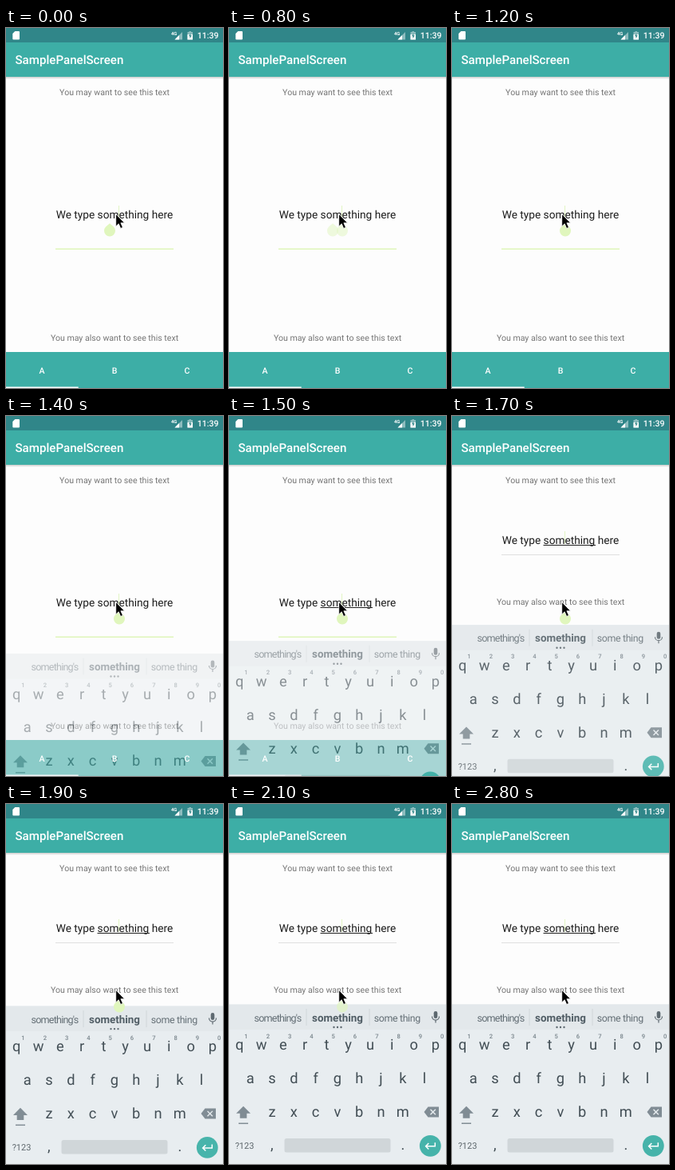
An HTML page that plays this animation: 272x450 px, repeating every 3000 ms.

```html
<!DOCTYPE html>
<html lang="en">
<head>
<meta charset="utf-8">
<style>
  html, body { margin: 0; width: 100%; height: 100%; overflow: hidden; background: #fdfdfd; }
  svg { display: block; width: 272px; height: 450px; font-family: Roboto, sans-serif; text-rendering: geometricPrecision; }
  .mid { text-anchor: middle; }
  .note { font-size: 10.58px; fill: #757575; }
  .medium { font-weight: 500; }
  .key { font-size: 18.3px; fill: #414d54; }
  .hint { font-size: 7.6px; font-weight: 500; fill: #78848b; }
</style>
</head>
<body>
<svg viewBox="0 0 272 450">
  <defs>
    <linearGradient id="shade" x2="0" y2="1">
      <stop stop-opacity=".2"/><stop offset="1" stop-opacity="0"/>
    </linearGradient>
    <path id="drop" d="M0-8.8 L5-4.4 A7 7 0 1 1-5-4.4Z" fill="#e0f6bd"/>
  </defs>

  <rect width="272" height="450" fill="#fdfdfd"/>
  <rect y="61" width="272" height="3" fill="url(#shade)"/>
  <rect y="18" width="272" height="43" fill="#3daea6"/>
  <rect width="272" height="18" fill="#308689"/>
  <text x="11.5" y="45.2" font-size="15.1" class="medium" fill="#fff">SamplePanelScreen</text>

  <g fill="#fff">
    <path d="M11.3 4H16q1 0 1 1v8.500q0 1-1 1H9.300q-1 0-1-1V7Z"/>
    <text x="207" y="8.500" font-size="5.800" font-weight="700">4G</text>
    <path d="M221 5V14.500H211.500Z" opacity=".45"/>
    <path d="M217 9V14.500H211.500Z"/>
    <path d="M227.500 5h2V4h2.500v1h2v9.500h-6.500Z" opacity=".45"/>
    <path d="M227.500 8h6.500v6.500h-6.500Z"/>
    <path d="M231.300 6.500l-2.300 3.800h1.500v3l2.300-4h-1.500Z" fill="#308689"/>
    <text x="239.700" y="12.900" font-size="10.600" class="medium">11:39</text>
  </g>

  <text x="136" y="84" class="mid note">You may want to see this text</text>
  <text id="lower" x="136" class="mid note">You may also want to see this text</text>
  <g id="field">
    <text x="136" y="237.900" font-size="13.7" class="mid" fill="#1c1c1c">We type something here</text>
    <path id="underline" d="M114.500 239.500H180" stroke="#222"/>
    <path d="M141.500 222v16" stroke="#d9f2b0" stroke-opacity=".75"/>
  </g>
  <path id="rule"/>

  <g id="tabs">
    <rect y="405" width="272" height="45" fill="#3daea6"/>
    <rect y="448.500" width="90.700" height="1.500" fill="#fff"/>
  </g>

  <g id="keyboard">
    <rect y="250.500" width="272" height="199.500" fill="#e8edf0"/>
    <rect y="250.500" width="272" height="31.500" fill="#e3e8eb"/>
    <path d="M97 256v21M176 256v21" stroke="#d0d6d9"/>
    <g class="mid" fill="#636e75">
      <text x="61" y="271.700" font-size="12.6" letter-spacing="-.8">something's</text>
      <text x="136" y="271.700" font-size="13.4" font-weight="700" fill="#4f5c64">something</text>
      <text x="210.800" y="271.700" font-size="12.4" letter-spacing="-.35">some thing</text>
    </g>
    <g fill="#5d686f">
      <circle cx="131.500" cy="279" r="1.200"/><circle cx="136" cy="279" r="1.200"/><circle cx="140.500" cy="279" r="1.200"/>
      <rect x="256.700" y="259" width="4.600" height="9" rx="2.300"/>
      <path d="M254.500 265.500a4.500 4.500 0 0 0 9 0M259 270v3.500" fill="none" stroke="#5d686f" stroke-width="1.200"/>
    </g>
    <g id="keys" class="mid"></g>
    <g fill="#808c94">
      <path d="M18 377.700L27 386.800H22.300V392.800H13.700V386.800H9Z"/>
      <rect x="12" y="398.500" width="12" height="1.500"/>
      <path d="M244.500 385L249.500 378.500H263V391.500H249.500Z"/>
      <path d="M252.500 381.800l6.400 6.400m0-6.400l-6.400 6.400" stroke="#e8edf0" stroke-width="1.400"/>
    </g>
    <text x="19.500" y="431" font-size="11" class="mid" fill="#5c666b">?123</text>
    <rect x="69.500" y="418" width="133" height="17.500" rx="2.500" fill="#d0d6d9"/>
    <circle cx="252.300" cy="427.300" r="13.400" fill="#46b3aa"/>
    <path d="M258.300 423.300v4.500H246.800m3.500-3.700l-3.700 3.700 3.700 3.700" fill="none" stroke="#fff" stroke-width="1.500"/>
  </g>

  <g id="labels" class="mid medium" font-size="10.58" fill="#fff">
    <text x="45" y="432">A</text><text x="136" y="432">B</text><text x="227" y="432">C</text>
  </g>

  <use id="oldDrop" href="#drop" x="130" y="253"/>
  <use id="newDrop" href="#drop" x="142" y="253"/>
  <path d="M137.700 232.500V247.900L141.200 244.700 143.700 250.500 146.400 249.300 143.900 243.700H148.600Z" stroke="#fff" stroke-width=".8"/>
</svg>

<script>
const LOOP = 3000, STEP = 100;
const el = id => document.getElementById(id);
const set = (id, attrs) => {
  for (const name in attrs) el(id).setAttribute(name, attrs[name]);
};
const clamp = v => Math.min(1, Math.max(0, v));
const ramp = (t, from, to) => clamp((t - from) / (to - from));

function addText(x, y, text, className) {
  const node = document.createElementNS(el('keys').namespaceURI, 'text');
  node.setAttribute('x', x);
  node.setAttribute('y', y);
  node.setAttribute('class', className);
  node.textContent = text;
  el('keys').append(node);
}

function addRow(x, y, letters, className = 'key') {
  [...letters].forEach((letter, i) => addText(x + i * 27.3, y, letter, className));
}

addRow(13.2, 307.3, 'qwertyuiop');
addRow(21.5, 292.7, '1234567890', 'hint');
addRow(26.7, 348.9, 'asdfghjkl');
addRow(54, 390.9, 'zxcvbnm');
addText(53.7, 432, ',', 'key');
addText(218, 432, '.', 'key');

function draw(t) {
  const resized = t >= 1600;
  set('field', { transform: `translate(0 ${resized ? -78 : 0})` });
  set('lower', { y: resized ? 235.5 : 390.5 });
  set('rule', resized
    ? { d: 'M62 173.500H210', stroke: '#e0e0e0', 'stroke-width': 1 }
    : { d: 'M62 276.200H210', stroke: '#dff6b9', 'stroke-width': 1.4 });
  set('underline', { opacity: t >= 1500 ? 1 : 0 });
  for (const id of ['tabs', 'labels']) set(id, { opacity: resized ? 0 : 1 });

  // The keyboard rises while fading in, then settles.
  const drop = 46.5 * (1 - ramp(t, 1400, 2175)) ** 3;
  const alpha = t < 1400 ? 0 : 1 - 0.54 * (1 - ramp(t, 1400, 2000)) ** 2;
  set('keyboard', { transform: `translate(0 ${drop})`, opacity: alpha });

  const swap = ramp(t, 500, 1100);
  set('oldDrop', { opacity: 1 - swap });
  set('newDrop', { opacity: swap * (1 - ramp(t, 1900, 2500)) });
}

const start = performance.now();
function tick() {
  const t = (performance.now() - start) % LOOP;
  draw(Math.floor(t / STEP) * STEP);
  requestAnimationFrame(tick);
}
tick();
</script>
</body>
</html>
```
